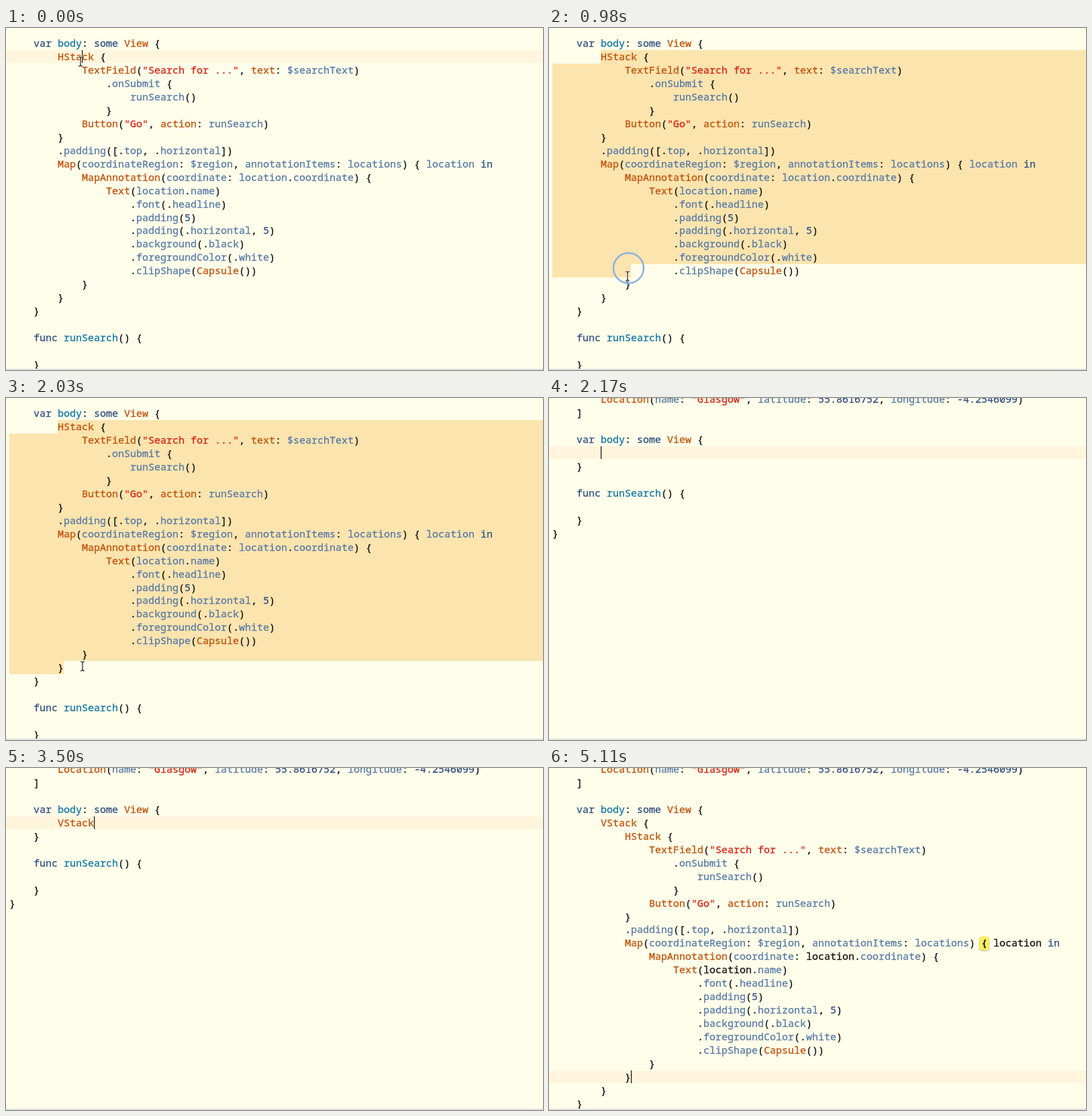
Animation, 800 px wide and 510 px high, one loop 5180 ms. Source, as an HTML page with a canvas:

```html
<!DOCTYPE html>
<html lang="en">
<head>
<meta charset="utf-8">
<title>Wrapping views in a VStack</title>
<style>
  html, body { margin: 0; width: 100%; height: 100%; overflow: hidden; background: #fffeea; }
  canvas { display: block; }
</style>
</head>
<body>
<canvas id="stage" width="800" height="510"></canvas>
<script>
const ctx = document.getElementById('stage').getContext('2d');
const LOOP = 5180, STEP = 70, CHAR = 9, LEFT = 5, LINE = 19.94;
const MONO = '15px "Noto Sans Mono", "DejaVu Sans Mono", monospace';
const COLORS = {
  plain: '#111', keyword: '#2f4e80', type: '#c1500a', name: '#0e75a8',
  member: '#5678a6', string: '#d9200f', number: '#2f4a80'
};
const KEYWORDS = /^(var|some|in|func)$/;
const TYPES = /^(View|[HV]Stack|TextField|Button|Map|MapAnnotation|Text|Capsule|Location|text|action)$/;

const block = `HStack {
    TextField("Search for ...", text: $searchText)
        .onSubmit {
            runSearch()
        }
    Button("Go", action: runSearch)
}
.padding([.top, .horizontal])
Map(coordinateRegion: $region, annotationItems: locations) { location in
    MapAnnotation(coordinate: location.coordinate) {
        Text(location.name)
            .font(.headline)
            .padding(5)
            .padding(.horizontal, 5)
            .background(.black)
            .foregroundColor(.white)
            .clipShape(Capsule())
    }
}`.split('\n');
const indent = (lines, n) => lines.map(line => ' '.repeat(n) + line);
const opening = '    var body: some View {';
const closing = ['    }', '', '    func runSearch() {', '', '    }', '}'];
const heading = [
  '        Location(name: "Glasgow", latitude: 55.8616752, longitude: -4.2546099)',
  '    ]', '', opening
];
const before = [opening, ...indent(block, 8), ...closing];

// Text typed on the empty line: [start time, text]
const typing = [[2100, ''], [2590, 'V'], [2660, 'Vs'], [3080, 'Vst'],
  [3500, 'VStack'], [3990, 'VStack '], [4270, 'VStack {']];
const NEWLINE = 4550, PASTE = 4830, MATCH = 5040;

// Mouse path: [time, x, y]
const path = [[0, 111, 50], [140, 100, 48], [350, 78, 44], [490, 77, 44],
  [560, 92, 110], [630, 106, 193], [700, 114, 256], [770, 116, 312], [840, 118, 348],
  [910, 118.5, 358], [980, 117, 370], [1190, 117, 372], [1400, 114, 400]];

const suggestions = [
  ['S', 'VStack'], ['I', 'VStack(alignment:spacing:content:)'],
  ['S', 'VSplitView'], ['I', 'VSplitView(content:)'],
  ['S', 'VStackLayout'], ['I', 'VStackLayout(alignment:spacing:)'],
  ['S', 'LazyVStack'], ['I', 'LazyVStack(alignment:spacing:pinnedViews:content:)'],
  ['f', 'vscanf_l()']
];
const filtered = [0, 1, 4, 5, 6, 7, 2].map(i => suggestions[i]);
const BADGES = { S: '#c44fd4', I: '#2ab2f6', f: '#35b83f' };

const columnX = col => LEFT + col * CHAR;

function mouseAt(t) {
  const i = path.findIndex(p => p[0] > t);
  if (i < 0) return path.at(-1).slice(1);
  const [t0, x0, y0] = path[i - 1], [t1, x1, y1] = path[i];
  const k = (t - t0) / (t1 - t0);
  return [x0 + (x1 - x0) * k, y0 + (y1 - y0) * k];
}

function rect(x, y, w, h, color, radius = 0) {
  ctx.fillStyle = color;
  ctx.beginPath();
  ctx.roundRect(x, y, w, h, radius);
  ctx.fill();
}

// A hairline outline gives regular text a medium weight.
function label(text, x, y, color, style = '500') {
  ctx.font = `${style} ${MONO}`;
  ctx.fillStyle = ctx.strokeStyle = color;
  ctx.fillText(text, x, y + 5);
  if (style !== '500') return;
  ctx.lineWidth = 0.3;
  ctx.strokeText(text, x, y + 5);
}

function drawCode(line, y, pasted) {
  let previous = '';
  for (const { 0: token, index } of line.matchAll(/"[^"]*"|-?\d[\d.]*|[$\w]+|[^\s\w"$]/g)) {
    let kind = 'member';
    if (token[0] === '"') kind = 'string';
    else if (/^-?\d/.test(token)) kind = 'number';
    else if (KEYWORDS.test(token)) kind = 'keyword';
    else if (TYPES.test(token)) kind = 'type';
    else if (token === 'body' || previous === 'func') kind = 'name';
    else if (/^(\W|Vs?t?)$/.test(token) || pasted && token === 'location') kind = 'plain';
    label(token, columnX(index), y, COLORS[kind]);
    previous = token;
  }
}

function drawSelection(t, rowY) {
  const [x, y] = mouseAt(t - 95);
  const last = Math.round((y - rowY(0)) / LINE);
  const endX = columnX(Math.min(before[last].length, Math.round((x - LEFT) / CHAR)));
  for (let row = 1; row <= last; row++) {
    const top = Math.round(rowY(row) - LINE / 2), bottom = Math.round(rowY(row) + LINE / 2);
    const from = row === 1 ? columnX(8) : LEFT;
    const to = row === last ? endX : 800;
    rect(from, top, Math.max(0, to - from), bottom - top, '#fce4ae');
  }
}

function drawMouse(t) {
  if (t >= 420 && t < 1750) {
    const [x, y] = mouseAt(t - 70);
    ctx.strokeStyle = '#8bb0e2';
    ctx.lineWidth = 2.5;
    ctx.beginPath();
    ctx.arc(x, y, 22.5, 0, 7);
    ctx.stroke();
  }
  const [x, y] = mouseAt(t).map(v => Math.round(v));
  const beam = new Path2D(`M${x - 3} ${y - 7}q3 0 3 2.5v9q0 2.5-3 2.5m6-14q-3 0-3 2.5v9q0 2.5 3 2.5`);
  for (const [color, width] of [['#fffc', 3], ['#222', 1.2]]) {
    ctx.strokeStyle = color;
    ctx.lineWidth = width;
    ctx.stroke(beam);
  }
}

function drawSuggestion([kind, text], y, selected, query) {
  if (selected) rect(44, y - 11, 494, 22, '#569eff', 4);
  rect(53, y - 8, 16, 16, selected ? '#fff' : BADGES[kind], 3);
  ctx.font = 'bold 12px Inter, sans-serif';
  ctx.fillStyle = selected ? '#569eff' : '#fff';
  ctx.textAlign = 'center';
  ctx.fillText(kind, 61, y + 4.5);
  ctx.textAlign = 'left';

  const [name, params] = text.split(/(?=\()/);
  const typed = name.search(new RegExp(query, 'i'));
  const start = typed < 0 ? name.search(/vs/i) : typed;
  const end = start + (typed < 0 ? 2 : query.length);
  const at = col => 78 + col * CHAR;
  const color = selected ? '#fff' : '#3a3738';
  label(name.slice(0, start), at(0), y, color);
  label(name.slice(start, end), at(start), y, selected ? '#fff' : '#111', 'bold');
  label(name.slice(end), at(end), y, color);
  for (const { 0: part, index } of (params || '').matchAll(/\w+|\W/g)) {
    const x = at(name.length + index);
    if (part === 'content') label(part, x, y, '#222');
    else if (/\w/.test(part)) label(part, x, y, '#918b8d', 'italic 400');
    else label(part, x, y, '#b5aeb0', '400');
  }
}

function drawPopup(query) {
  const full = query.length < 3;
  const items = full ? suggestions : filtered;
  const bottom = full ? 311 : 282, footer = bottom - 30;
  ctx.save();
  ctx.shadowColor = '#0005';
  ctx.shadowBlur = 10;
  ctx.shadowOffsetY = 2;
  rect(39, 91.5, 517, bottom - 91.5, '#ede6e6', 6);
  ctx.restore();
  ctx.strokeStyle = '#c9c2c0';
  ctx.lineWidth = 1;
  ctx.stroke();

  ctx.save();
  ctx.beginPath();
  ctx.rect(39, 91, 517, footer - 91);
  ctx.clip();
  items.forEach((item, i) => drawSuggestion(item, 107.3 + i * 21.83, i === 0, query));
  ctx.restore();
  if (full) rect(546, 95, 7, 104, '#b8b1b2', 3.5);
  rect(40, footer, 515, 1, '#d3cccc');
  label('VStack', 52, footer + 15, '#14587a');
}

function drawBracketMatch(t, y) {
  const scale = t < MATCH + STEP ? 1.25 : 1;
  ctx.save();
  ctx.translate(columnX(71) + 4.5, y);
  ctx.scale(scale, scale);
  ctx.shadowColor = '#0005';
  ctx.shadowBlur = 3;
  ctx.shadowOffsetY = 1;
  rect(-7, -10, 14, 20, '#fdf154', 4);
  ctx.shadowColor = 'transparent';
  label('{', -4.5, 0, '#111', 'bold');
  ctx.restore();
}

function draw(t) {
  const editing = t >= 2100, pasted = t >= PASTE;
  const rowY = row => (editing ? 2.2 : 23.3) + row * LINE;
  const typed = typing.findLast(([start]) => t >= start)?.[1] ?? '';
  let lines = before, caret = [1, 12];
  if (editing) {
    const inner = pasted ? indent(block, 12) : [' '.repeat(12)];
    const body = t >= NEWLINE ? [...inner, '        }'] : [];
    lines = [...heading, '        ' + typed, ...body, ...closing];
    caret = [4, 8 + typed.length];
    if (t >= NEWLINE) caret = [4 + inner.length, inner.at(-1).length];
  }
  const showCaret = editing || t < 630;
  const [row, col] = caret;
  const top = Math.round(rowY(row) - LINE / 2);

  rect(0, 0, 800, 510, '#fffeea');
  if (showCaret) rect(0, top, 800, 19, '#fff5dd');
  else drawSelection(t, rowY);
  lines.forEach((line, i) => drawCode(line, rowY(i), pasted));
  if (showCaret) rect(columnX(col), top, 1.2, 19, '#111');
  if (t >= MATCH) drawBracketMatch(t, rowY(13));
  if (!editing) drawMouse(t);
  if (t >= 2800 && t < 3500) drawPopup(typed);
  rect(0, 508, 800, 2, '#e4e2dd');
}

function frame(now) {
  draw(Math.floor(now % LOOP / STEP) * STEP);
  requestAnimationFrame(frame);
}
frame(performance.now());
</script>
</body>
</html>
```
